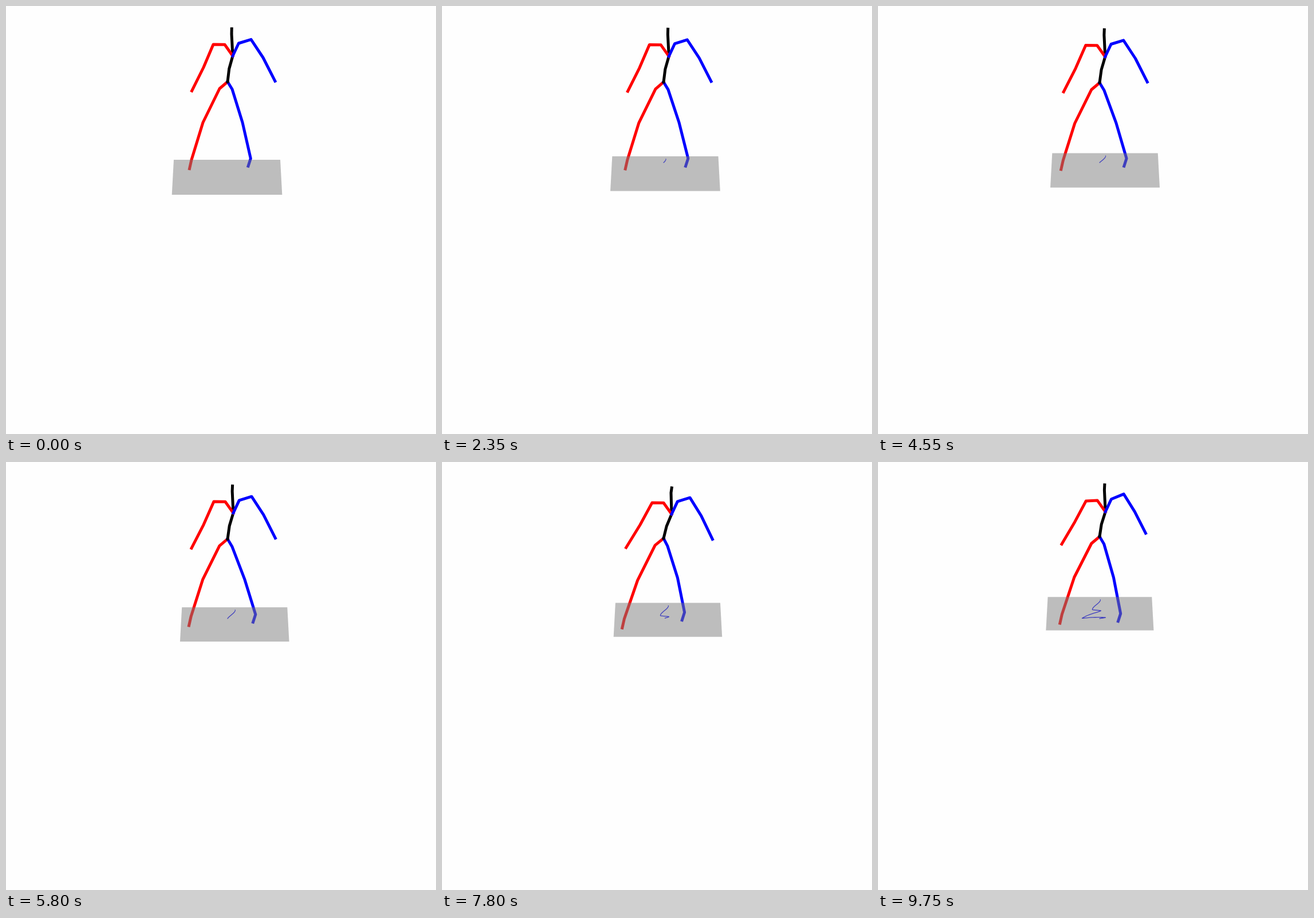
Write an HTML page with a canvas that moves like this. It is 751x746 px and loops after 9.8 s.

```html
<!DOCTYPE html>
<html>
<head>
<meta charset="utf-8">
<style>
html, body { margin: 0; width: 100%; height: 100%; overflow: hidden; background: #fefefe; }
canvas { display: block; }
</style>
</head>
<body>
<canvas id="stage" width="751" height="746"></canvas>
<script>
const ctx = document.getElementById('stage').getContext('2d');
const LOOP = 9800, STEP = 50;
const RED = '#f00', BLUE = '#00f', BLACK = '#000';

// Smooth rise from 0 to 1 between two times
function ramp(t, from, to) {
  const u = Math.min(1, Math.max(0, (t - from) / (to - from)));
  return u * u * (3 - 2 * u);
}

const bump = (t, center, width) => Math.exp(-(((t - center) / width) ** 2));

// Slow drift, then the weight swings from side to side and settles
const drift = t => ramp(t, 0, 6750);
const settle = t => ramp(t, 9000, 9750);
const swing = t => -15 * ramp(t, 6750, 7500) + 33 * ramp(t, 7500, 8350)
  - 41 * ramp(t, 8350, 9000) + 10.4 * settle(t);

const floorAt = t => [
  386 + 14 * drift(t) + swing(t),
  268 - t * .00255 - 8 * ramp(t, 7500, 8300) - 3 * bump(t, 8350, 250)
];

const shift = ([x, y], [dx, dy]) => [x + dx, y + dy];
const middle = ([ax, ay], [bx, by]) => [(ax + bx) / 2, (ay + by) / 2];

function line(points, color, width) {
  ctx.beginPath();
  points.forEach(([x, y]) => ctx.lineTo(x, y));
  ctx.strokeStyle = color;
  ctx.lineWidth = width;
  ctx.stroke();
}

function drawBody(t) {
  const slow = drift(t), sway = swing(t), rest = settle(t);
  const step = bump(t, 8000, 600), rise = ramp(t, 7200, 8900);

  const hip = [0, 2.3 * slow - 4.3 * rise];
  const chest = [slow + 5.5 * bump(t, 8250, 800), 2 * slow + 2.8 * step - 2.2 * rise];
  const head = [chest[0] * 1.4, chest[1] + chest[0] * .3];
  const rightHand = [-.6 * chest[0] - 3 * rest, hip[1] - 3 * rest];
  const leftHand = [.5 * chest[0] - 3 * rest, chest[1] - 6.5 * rest];
  const rightFoot = [.85 * sway - slow + 9 * rest, 1.7 * slow + 5.8 * step - 4.2 * rise];
  const leftFoot = [sway + 9 * slow - 8 * step, 1.5 * rise - 4.5 * step - 3 * rest];

  const pelvis = shift([387, 132], hip), neck = shift([396, 87], chest);

  function leg(color, side, thigh, knee, ankle, toe, foot) {
    const kneeShift = [foot[0] * .43, (hip[1] + foot[1]) / 2];
    line([pelvis, shift(thigh, [side * chest[0], hip[1]]), shift(knee, kneeShift),
      shift(ankle, foot), shift(toe, foot)], color, 5);
  }

  function arm(color, tilt, collar, shoulder, elbow, wrist, hand) {
    line([neck, shift(collar, chest), shift(shoulder, shift(chest, [0, tilt * rest])),
      shift(elbow, middle(chest, hand)), shift(wrist, hand)], color, 5);
  }

  leg(RED, -.17, [373, 144], [344, 203], [324, 268], [320.5, 283.5], rightFoot);
  leg(BLUE, -.25, [395, 145], [413, 203], [427.3, 265.7], [423, 279.2], leftFoot);
  line([pelvis, shift([389.7, 109.5], middle(hip, chest)), neck,
    shift([394, 49], middle(chest, head)), shift([394.2, 39.7], head)], BLACK, 5);
  arm(RED, 1.3, [382, 67.3], [362, 67], [345, 107], [324.6, 148], rightHand);
  arm(BLUE, -2.2, [406.3, 65], [428, 58.3], [449, 90], [469.9, 130.8], leftHand);
}

// Path walked so far, seen from the body
function drawTrail(t, x, y) {
  const points = [];
  for (let s = 0; s < t; s += STEP) {
    const [px, py] = floorAt(s);
    points.push([387 + x - px, 273 + y - py]);
  }
  line(points, BLUE, 1.3);
}

function drawFloor(x, y) {
  const rise = 268 - y, scale = 1 - rise * .0007;
  const top = 93 * scale, bottom = 96.3 * scale, end = y + 61 - rise * .08;
  ctx.beginPath();
  ctx.moveTo(x - top, y);
  ctx.lineTo(x + top, y);
  ctx.lineTo(x + bottom, end);
  ctx.lineTo(x - bottom, end);
  ctx.fillStyle = 'rgba(127, 127, 127, .5)';
  ctx.fill();
}

function draw(now) {
  const t = Math.floor(now % LOOP / STEP) * STEP;
  const [x, y] = floorAt(t);
  ctx.fillStyle = '#fefefe';
  ctx.fillRect(0, 0, 751, 746);
  ctx.lineJoin = 'round';
  ctx.lineCap = 'square';
  drawTrail(t, x, y);
  drawBody(t);
  drawFloor(x, y);
}

const start = performance.now();
function tick() {
  draw(performance.now() - start);
  requestAnimationFrame(tick);
}
tick();
</script>
</body>
</html>
```
